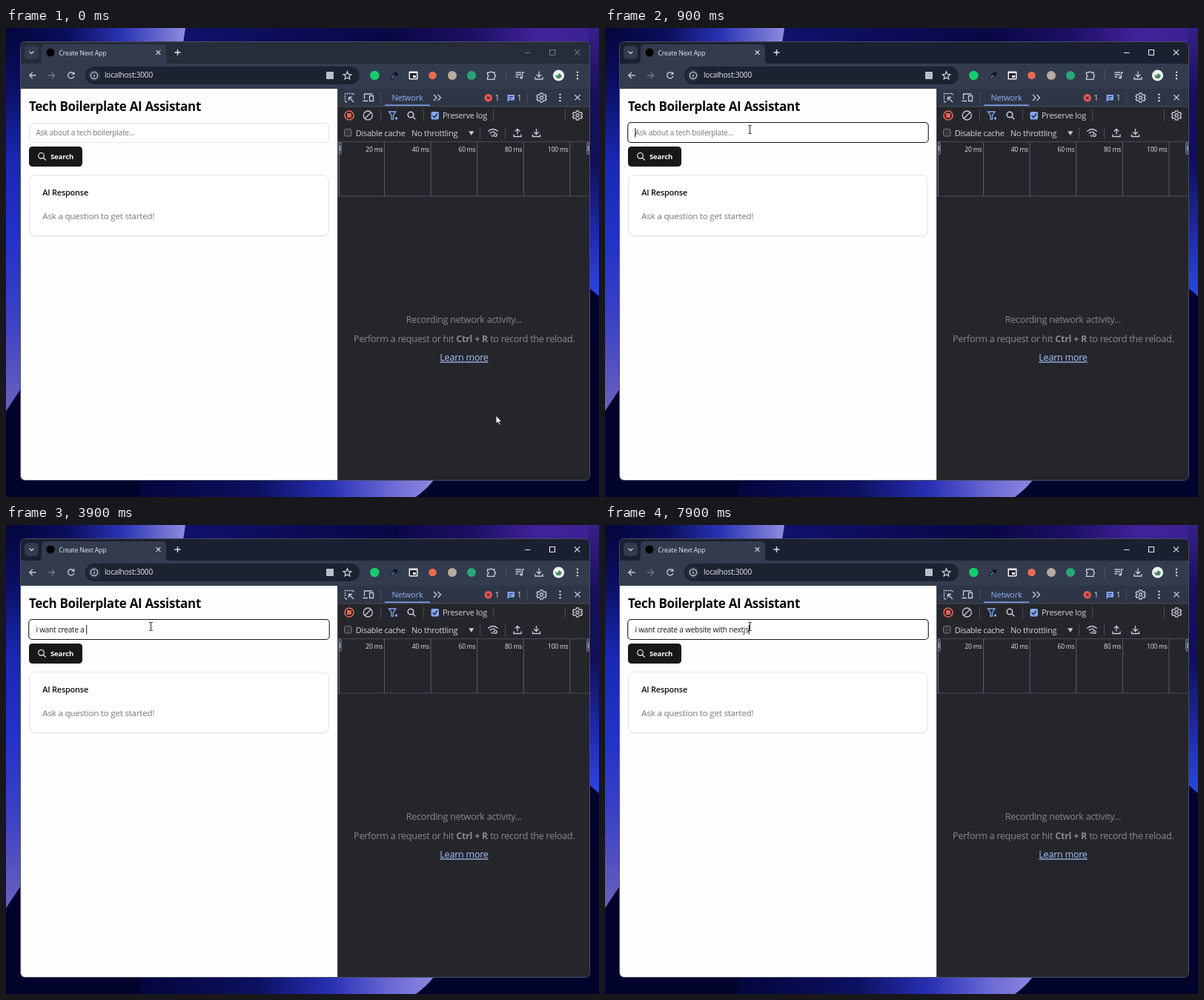
An HTML page that plays this animation: 800x633 px, repeating every 8 s.

```html
<!DOCTYPE html>
<html lang="en">
<head>
<meta charset="utf-8">
<title>Search assistant</title>
<style>
html, body { margin: 0; width: 100%; height: 100%; overflow: hidden; background: #02032d }
svg { display: block; width: 800px; height: 633px }
text { font-family: "Open Sans", "Noto Sans", sans-serif; letter-spacing: -.02em; white-space: pre; stroke: none }
.line { fill: none; stroke: #c9ccd5; stroke-width: 1.3 }
.blue { stroke: #83a6f6 }
.dim { stroke: #71788a }
.rule { fill: none; stroke: #4a4c55 }
.tools text { font-size: 10.95px; fill: #d2d4db }
.ticks text { font-size: 8.5px; fill: #e3e4e8; text-anchor: end }
.ticks .rule { stroke: #5a5c65 }
.empty text { font-size: 12.55px; fill: #888a90; text-anchor: middle }
</style>
</head>
<body>
<svg viewBox="0 0 800 633">
  <defs>
    <linearGradient id="left" x2="0" y2="1">
      <stop stop-color="#04063c"/><stop offset=".15" stop-color="#0a0f62"/><stop offset=".35" stop-color="#1a28b4"/>
      <stop offset=".55" stop-color="#2232c8"/><stop offset=".75" stop-color="#3a40c4"/><stop offset="1" stop-color="#6a60be"/>
    </linearGradient>
    <linearGradient id="topLeft">
      <stop stop-color="#04063c"/><stop offset=".35" stop-color="#0a0e5c"/><stop offset=".65" stop-color="#2a34b4"/><stop offset="1" stop-color="#8e8ce0"/>
    </linearGradient>
    <linearGradient id="topRight">
      <stop stop-color="#10126c"/><stop offset=".25" stop-color="#0c0c58"/><stop offset=".5" stop-color="#0a0744"/>
      <stop offset=".7" stop-color="#1c1064"/><stop offset=".85" stop-color="#40229a"/><stop offset="1" stop-color="#3a2290"/>
    </linearGradient>
    <linearGradient id="right" x2="0" y2="1">
      <stop stop-color="#35208a"/><stop offset=".25" stop-color="#180f5c"/><stop offset=".5" stop-color="#100f5c"/>
      <stop offset=".75" stop-color="#1c28a8"/><stop offset="1" stop-color="#2e46e0"/>
    </linearGradient>
    <linearGradient id="bottom">
      <stop stop-color="#04063c"/><stop offset=".4" stop-color="#0c1060"/><stop offset=".65" stop-color="#2830b4"/>
      <stop offset=".85" stop-color="#6a68d4"/><stop offset="1" stop-color="#8c88de"/>
    </linearGradient>
    <g id="gear" class="line">
      <path d="M-1.4-6.2H1.4L1.9-4.4 3.4-3.5 5.2-4.1 6.5-1.8 5.1-.6V.6L6.5 1.8 5.2 4.1 3.4 3.5 1.9 4.4 1.4 6.2H-1.4L-1.9 4.4-3.4 3.5-5.2 4.1-6.5 1.8-5.1.6V-.6L-6.5-1.8-5.2-4.1-3.4-3.5-1.9-4.4Z"/>
      <circle r="2"/>
    </g>
    <g id="dots" fill="#d5d8e0"><circle cy="-4.3" r="1.2"/><circle r="1.2"/><circle cy="4.3" r="1.2"/></g>
    <path id="down" class="line" d="M0-5.5V2M-3.2-1.2 0 2 3.2-1.2M-5 2V5H5V2"/>
    <path id="up" class="line" d="M0 2V-5.2M-3.2-2 0-5.2 3.2-2M-5 2V5H5V2"/>
    <g id="lens" fill="none"><circle cx="-1" cy="-1" r="3.8"/><path d="M1.8 1.8 5.2 5.2"/></g>
    <path id="cross" d="M-3.6-3.6 3.6 3.6M3.6-3.6-3.6 3.6"/>
  </defs>

  <!-- wallpaper -->
  <path fill="#02032d" d="M0 0H800V633H0Z"/>
  <path fill="url(#topRight)" d="M236 0H800V20H236Z"/>
  <path fill="url(#topLeft)" d="M0 0H242L239 20H0Z"/>
  <path fill="url(#left)" d="M0 0H20V487L0 517Z"/>
  <path fill="url(#right)" d="M786 0H800V362L786 350Z"/>
  <path fill="url(#bottom)" d="M180 610H577Q568 622 553 633H180Z"/>

  <!-- window frame -->
  <rect id="tabStrip" x="20" y="19" width="767" height="591" rx="6"/>
  <rect x="25" y="24" width="19" height="18" rx="5" fill="#333b4e"/>
  <path class="line" d="M31.5 31.5 34.5 34.5 37.5 31.5"/>
  <path fill="#333b4e" d="M43 48Q48 48 48 43V28Q48 22 54 22H210Q216 22 216 28V43Q216 48 221 48H787V82H20V48Z"/>
  <circle cx="60" cy="33" r="5.5" fill="#000"/>
  <text x="71.5" y="36.6" font-size="8.75" fill="#e6e8ef">Create Next App</text>
  <g class="line">
    <use href="#cross" transform="translate(205.5 33) scale(.8)" stroke="#e6e8ef"/>
    <path d="M231.5 29V37M227.5 33H235.5" stroke="#e6e8ef"/>
  </g>
  <g id="controls" fill="none" stroke-width="1.1">
    <path d="M700 33.5H707.5M733.5 29.5H740.5V36.5H733.5Z"/><use href="#cross" x="770.5" y="33"/>
  </g>

  <!-- address bar -->
  <g class="line">
    <path d="M40.5 64H32M35.8 60 31.8 64 35.8 68"/>
    <path class="dim" d="M57 64H65.5M61.7 60 65.7 64 61.7 68"/>
    <path d="M91 61.2A4.1 4.1 0 1 0 91.8 65M91.8 59.2V62.3H88.6"/>
  </g>
  <rect x="107" y="52" width="370" height="24" rx="12" fill="#1d2231"/>
  <circle cx="119" cy="64" r="8.5" fill="#2b3142"/>
  <g class="line"><circle cx="119" cy="64" r="4.6"/><path d="M119 63.3V66.6M119 61.2V62.3"/></g>
  <text x="133" y="67.4" font-size="10.06" fill="#e4e6ed">localhost:3000</text>
  <rect x="432" y="59" width="10" height="10" rx="1" fill="#b9bec9"/>
  <path class="line" d="M460.5 58.8 462 62.4 465.8 62.7 462.9 65.2 463.8 69 460.5 67 457.2 69 458.1 65.2 455.2 62.7 459 62.4Z"/>

  <!-- extensions -->
  <circle cx="497.3" cy="64" r="6.2" fill="#13cf6b"/>
  <path d="M519 69 525 62" stroke="#12151e" stroke-width="3"/><path d="M523.5 60.5 527.5 64.5M525.5 62.5 527.5 60.5" stroke="#11131c" stroke-width="3"/>
  <path d="M520 68 524 63.5" stroke="#4f8ee0" stroke-width="1.2"/>
  <rect x="543.5" y="58.5" width="12" height="11" rx="1" fill="#f0f1f4"/><path fill="#20242f" d="M545 61H554V68H545ZM549 64H553V67H549Z" fill-rule="evenodd"/>
  <circle cx="575.5" cy="64" r="5.3" fill="#e56b4d"/>
  <circle cx="602" cy="64" r="6" fill="#b9aaa0"/>
  <circle cx="628" cy="64" r="6" fill="#2aa577"/>
  <path class="line" d="M649.5 60H652.6A1.8 1.8 0 0 1 656 60H659V63A1.8 1.8 0 0 1 659 66.5V69.3H649.5V66.5A1.8 1.8 0 0 0 649.5 63Z"/>
  <path d="M674.5 56V72" stroke="#4c556b"/>
  <path class="line" d="M687.5 60H695M687.5 63H695M687.5 66H691.5M696.5 67V60H699"/><circle cx="695" cy="67" r="1.8" fill="#c9ccd5"/>
  <use href="#down" x="719" y="64"/>
  <circle cx="745.5" cy="64" r="7.6" fill="#eef2ee"/><path fill="#498a67" d="M740.5 63 744 64.5 746 61 750 64 748 68H743Z"/>
  <use href="#dots" x="771" y="64"/>

  <!-- page -->
  <path fill="#fefeff" d="M20 82H447V610H25Q20 610 20 605Z"/>
  <text x="31" y="112" font-size="17.05" font-weight="700" fill="#0a0a0c">Tech Boilerplate AI Assistant</text>
  <rect x="31.5" y="128.5" width="404" height="26" rx="4.5" fill="#fff" stroke="#e4e5ea"/>
  <rect id="ring" x="30.75" y="127.5" width="405.5" height="27" rx="4.5" fill="#fff" stroke="#17171a" stroke-width="1.1"/>
  <text id="entry" x="40.4" y="145" font-size="10.08"></text>
  <rect id="caret" y="135" width="1" height="12.5" fill="#111"/>
  <rect x="31" y="160" width="72" height="27" rx="4.5" fill="#18181b"/>
  <use href="#lens" x="48.5" y="173.3" stroke="#fff" stroke-width="1.1"/>
  <text x="60" y="177" font-size="9.6" font-weight="700" fill="#fafafa">Search</text>
  <rect x="31.5" y="199.5" width="404.5" height="82" rx="8" fill="#e9eaee"/>
  <rect x="31.5" y="198.5" width="404" height="82" rx="8" fill="#fff" stroke="#e1e4ea"/>
  <text x="49.3" y="226.3" font-size="10.95" font-weight="600" fill="#0c0c0f">AI Response</text>
  <text x="49.3" y="258.3" font-size="11.63" fill="#77777f">Ask a question to get started!</text>

  <!-- developer tools -->
  <path fill="#25262c" d="M447 82H787V605Q787 610 782 610H447Z"/>
  <path fill="#2e3546" d="M447 82H787V106H447Z"/>
  <path class="rule" d="M448 106H787M448 153.5H787M448 227H787M447.5 82V610"/>
  <path class="rule" d="M505.5 86V102M703.5 86V102M505.5 110V126M563.5 110V126M657.5 110V126M754.5 110V126M639.5 134V150M673.5 134V150"/>
  <g class="tools">
    <path class="line" stroke-dasharray="2 1.2" d="M460 100H457.5V88.5H469V91"/>
    <path class="line" d="M469 100 462.5 93.5M462.5 98V93.5H467"/>
    <path class="line" d="M483.5 96V89H494.5M481.5 98.5H488M490.5 91.5H495.5V98.5H490.5Z"/>
    <text x="520.5" y="97.8" style="fill:#8fb0f8">Network</text>
    <path fill="#83a6f6" d="M511 103.5H572V105H511Z"/>
    <path class="line" d="M577 90 581 94 577 98M582.5 90 586.5 94 582.5 98"/>
    <circle cx="650.7" cy="94.3" r="5.2" fill="#e8574f"/><use href="#cross" transform="translate(650.7 94.3) scale(.5)" stroke="#2e3546" stroke-width="2.4"/>
    <text x="659.5" y="98.3">1</text>
    <path fill="#83a6f6" d="M676.5 90H686V97.5H679L676.5 100Z"/><path d="M678.5 92.5H684M678.5 95H682.5" stroke="#2e3546"/>
    <text x="689.5" y="98.3">1</text>
    <use href="#gear" x="722.5" y="94"/><use href="#dots" x="747.5" y="94"/>
    <use href="#cross" x="771" y="93.8" class="line"/>

    <circle cx="463" cy="118" r="6" fill="none" stroke="#ec6159" stroke-width="1.6"/><rect x="460" y="115" width="6" height="6" rx="1" fill="#ec6159"/>
    <g class="line"><circle cx="488.3" cy="118" r="6"/><path d="M484.1 113.8 492.5 122.2" transform="matrix(-1 0 0 1 976.6 0)"/></g>
    <path class="line blue" d="M516.5 113H526L522.5 117.8V123.2H520V117.8Z"/><circle cx="526.5" cy="122" r="1.7" fill="#83a6f6"/>
    <use href="#lens" x="547" y="118" stroke="#c9ccd5" stroke-width="1.5"/>
    <rect x="573.5" y="113" width="10.5" height="10.5" rx="2" fill="#83a6f6"/><path d="M575.7 118.3 578 120.6 582 115.8" fill="none" stroke="#1f2735" stroke-width="1.5"/>
    <text x="589" y="122">Preserve log</text>
    <use href="#gear" x="771" y="118"/>

    <rect x="456.5" y="136.5" width="9.5" height="9.5" rx="2" fill="#35363c" stroke="#777a82"/>
    <text x="471.7" y="145.8">Disable cache</text>
    <text x="547" y="145.8">No throttling</text>
    <path fill="#c9ccd5" d="M624.3 139.3H631.3L627.8 145Z"/>
    <path class="line" d="M650.3 139.6Q657 133.5 663.7 139.6M652.6 142.3Q656.6 138.9 660 140.9M654.6 144.6 657 146.8"/>
    <circle cx="660.3" cy="144.3" r="2" class="line"/>
    <use href="#up" x="690" y="141.5"/><use href="#down" x="715.5" y="141.5"/>
  </g>
  <g class="ticks" id="ticks">
    <path d="M449.3 154V227" stroke="#70737c"/>
    <path fill="#3c4252" stroke="#777c8a" d="M449 154.5H450.5Q452.5 154.5 452.5 157V168Q452.5 170.5 450.5 170.5H449ZM787 154.5H785.5Q783.5 154.5 783.5 157V168Q783.5 170.5 785.5 170.5H787Z"/>
    <path d="M450.5 159V166M785.8 159V166" stroke="#c6c9d2"/>
  </g>
  <g class="empty">
    <text x="618" y="398.3">Recording network activity...</text>
    <text x="618.3" y="423.8">Perform a request or hit <tspan font-weight="700">Ctrl + R</tspan> to record the reload.</text>
    <text x="618" y="449.3" style="fill:#a9c4f9" text-decoration="underline">Learn more</text>
  </g>
  <rect x="19.5" y="18.5" width="768" height="592" rx="6" fill="none" stroke="#4b4c62"/>

  <path id="arrow" fill="#fff" stroke="#1b1b20" stroke-width=".9" d="M0 0V11L2.5 8.8 4.3 12.8 6.1 12 4.4 8.2H7.7Z"/>
  <path id="beam" fill="none" stroke="#222" d="M193.3 131.5H195L195.5 132 196 131.5H197.7M195.5 132V142M193.3 142.5H195L195.5 142 196 142.5H197.7"/>
</svg>
<script>
const $ = id => document.getElementById(id);
const LOOP = 8000, STEP = 100, ACTIVATE = 400, HOVER = 600, FOCUS = 800;
const PLACEHOLDER = "Ask about a tech boilerplate...";
const FULL = "i want create a website with nextjs";

// pointer tip at each step until it enters the field
const pointer = [[661, 523], [470, 395], [238, 239], [216, 184], [203, 157], [203, 155]];

// [time, number of characters, optional mistyped text]
const typing = [
  [2000, 1], [2200, 2], [2300, 3], [2400, 4], [2500, 5], [2600, 6], [2800, 7], [2900, 8],
  [3200, 10], [3300, 11], [3500, 13], [3600, 14], [3800, 15], [3900, 16], [4100, 17], [4400, 18],
  [4800, 19], [5200, 18], [5300, 19], [5500, 20], [5700, 21], [5800, 23], [5900, 24],
  [6200, 25], [6300, 26], [6500, 0, "i want create a website wih"], [6800, 26], [6900, 27], [7000, 28], [7100, 29],
  [7300, 31], [7500, 32], [7700, 33], [7800, 34], [7900, 35]
];

for (let i = 0; i < 5; i++) {
  const x = 510.5 + i * 62.6;
  $("ticks").insertAdjacentHTML("beforeend",
    `<path class="rule" d="M${x} 154V227"/><text x="${x - 2.2}" y="166.8">${20 * (i + 1)} ms</text>`);
}

const show = (id, on) => $(id).setAttribute("visibility", on ? "visible" : "hidden");

function draw(time) {
  const t = Math.floor(time / STEP) * STEP;
  const active = t >= ACTIVATE;
  $("tabStrip").setAttribute("fill", active ? "#1b2031" : "#272c39");
  $("controls").setAttribute("stroke", active ? "#e8eaf0" : "#747987");
  show("ring", t >= FOCUS);

  const key = typing.findLast(k => k[0] <= t);
  const typed = key ? key[2] || FULL.slice(0, key[1]) : "";
  $("entry").textContent = typed || PLACEHOLDER;
  $("entry").setAttribute("fill", typed ? "#18181b" : "#77777f");
  $("caret").setAttribute("x", 40.4 + (typed ? $("entry").getComputedTextLength() : 0));
  show("caret", typed || (t >= 900 && t < 1400));

  show("arrow", t < HOVER);
  show("beam", t >= HOVER);
  const [x, y] = pointer[Math.min(t / STEP, pointer.length - 1)];
  $("arrow").setAttribute("transform", `translate(${x} ${y})`);
}

function tick() {
  draw(performance.now() % LOOP);
  requestAnimationFrame(tick);
}
tick();
</script>
</body>
</html>
```
